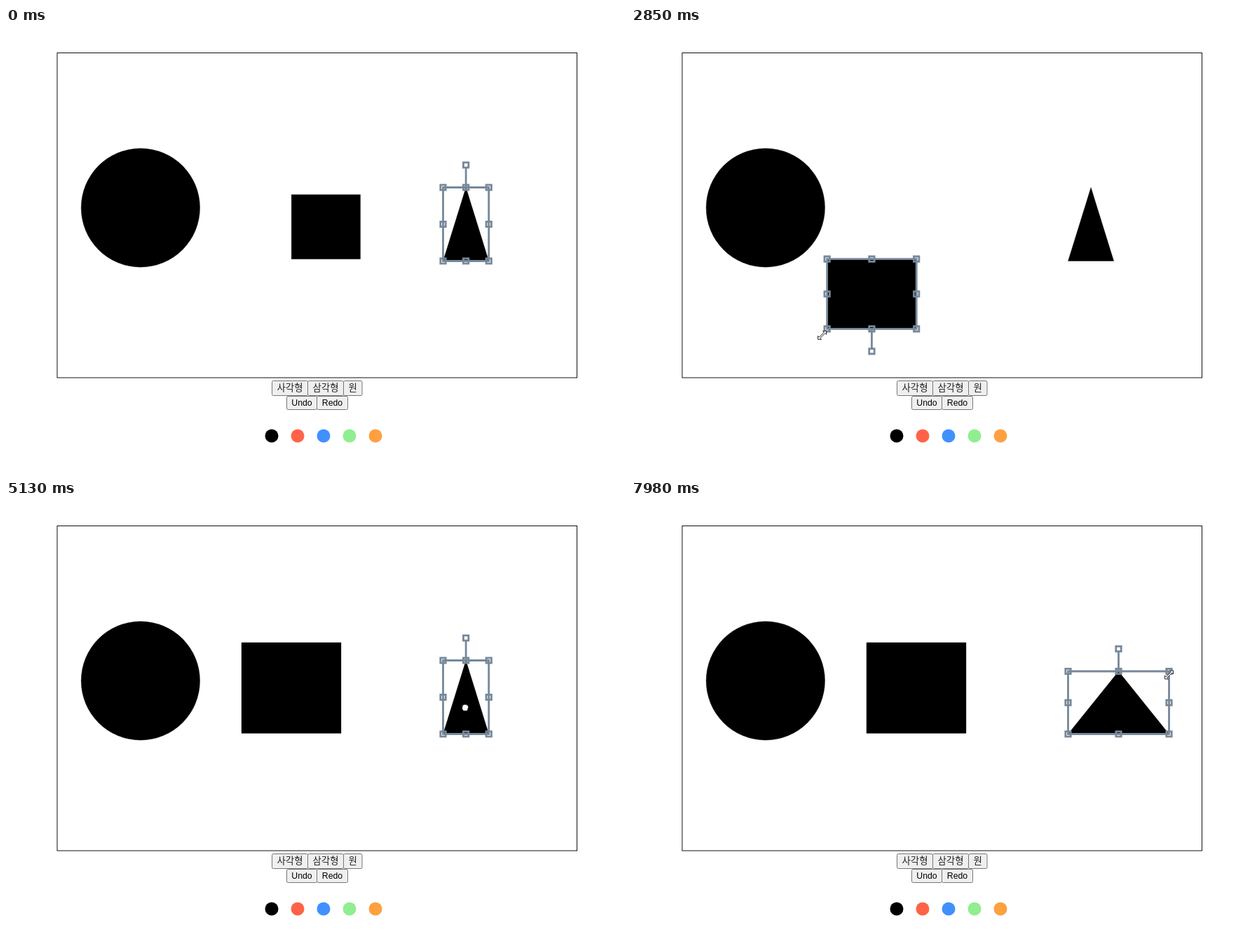
An HTML page that plays this animation: 883x635 px, repeating every 8000 ms.

```html
<!DOCTYPE html>
<html lang="ko">
<head>
<meta charset="utf-8">
<title>Shape editor</title>
<style>
  html, body { margin: 0; width: 100%; height: 100%; overflow: hidden; background: #fff; }
  svg { display: block; width: 883px; height: 635px; }
  .button { fill: #efefef; stroke: #767676; }
  .shape { stroke: #000; stroke-opacity: .4; stroke-width: .8; }
  text { text-anchor: middle; font: 12.3px "Liberation Sans", Arial, sans-serif; }
  text.ko { font: 300 13.4px "Noto Sans CJK KR", "Noto Sans CJK", sans-serif; fill: #222; }
  #selection { fill: none; stroke: #778899; stroke-width: 2.8; }
  #pointer { fill: #fff; stroke: #222; stroke-width: 1; }
</style>
</head>
<body>
<svg viewBox="0 0 883 635">
  <rect x="73" y="35.5" width="741.5" height="463.5" fill="none" stroke="#111"/>
  <g id="toolbar"></g>
  <circle class="shape" cx="191.9" cy="256.5" r="84.7"/>
  <path class="shape" id="square"/>
  <path class="shape" id="triangle"/>
  <path id="selection"/>
  <path id="pointer"/>
</svg>
<script>
const $ = id => document.getElementById(id);
const LOOP = 8000, TICK = 98.6, OFFSET = 18;

const button = (label, x, y, w, h, cls = '') =>
  `<rect class="button" x="${x}" y="${y}" width="${w}" height="${h}" rx="2"/>
   <text class="${cls}" x="${x + w / 2}" y="${y + h / 2 + 4.4}">${label}</text>`;

$('toolbar').innerHTML =
  button('사각형', 379.5, 503.5, 51, 21, 'ko') +
  button('삼각형', 430.5, 503.5, 51, 21, 'ko') +
  button('원', 481.5, 503.5, 26.5, 21, 'ko') +
  button('Undo', 400.5, 525.5, 43, 19) +
  button('Redo', 443.5, 525.5, 44, 19) +
  ['#000', '#ff6347', '#4090ff', '#90ee90', '#ffa040'].map((color, i) =>
    `<circle cx="${379 + 37 * i}" cy="582" r="9.5" fill="${color}"/>`).join('');

// Gestures are smooth curves through a few turning points: [tick, x, y].
const toSquare = gesture([4, 682, 616], [6, 477, 341], [8, 468, 265], [13, 470, 281], [15, 510, 242]);
const resizeSquare = gesture([21, 505.5, 237.8], [22, 531.5, 224], [24, 592, 130],
  [27, 490, 400], [29, 279.7, 429.3], [31, 261, 442], [34, 480, 265], [36, 265, 200]);
const intoSquare = gesture([36, 268, 205], [38, 385, 265]);
const moveSquare = gesture([38, 265, 200], [41, 269, 356], [44, 305.5, 280], [46, 527, 250], [48, 336, 202]);
const toTriangle = gesture([48, 456, 267], [52, 655, 295], [56, 697, 235]);
const resizeTriangle = gesture([59, 688.7, 227.5], [63, 570.3, 390], [65, 478, 428],
  [69.5, 672, 194], [71, 761.3, 237.3], [72, 781, 253], [75, 732, 262], [78, 781, 230],
  [80, 781, 242], [81, 767.5, 243]);

// Monotone cubic interpolation: slows to a stop at each turn and never overshoots.
function gesture(...keys) {
  const slope = (i, axis) =>
    (keys[i + 1][axis] - keys[i][axis]) / (keys[i + 1][0] - keys[i][0]);
  const tangent = (i, axis) => {
    if (i === 0 || i === keys.length - 1) return 0;
    const a = slope(i - 1, axis), b = slope(i, axis);
    return a * b > 0 ? 2 * a * b / (a + b) : 0;
  };
  return t => {
    if (t <= keys[0][0]) return keys[0].slice(1);
    const i = keys.findIndex(key => key[0] > t) - 1;
    if (i < 0) return keys[keys.length - 1].slice(1);
    const span = keys[i + 1][0] - keys[i][0], k = (t - keys[i][0]) / span;
    return [1, 2].map(axis => {
      const from = keys[i][axis], to = keys[i + 1][axis];
      return from + (to - from) * k * k * (3 - 2 * k) +
        span * k * (1 - k) * ((1 - k) * tangent(i, axis) - k * tangent(i + 1, axis));
    });
  };
}

const cursors = {
  arrow: 'M0 0V15L3.6 11.8 6 17.5 8.4 16.5 6 11H11Z',
  hand: 'M-4-1Q-5-4-2.5-4 -1-5.5.5-4.5 2-5 3-3.5 5-3.5 4.5 0L3 4.5H-2.5L-4.7 1Z',
  resize: 'M6-6H1L2.8-4.2-4.2 2.8-6 1V6H-1L-2.8 4.2 4.2-2.8 6-1Z'
};

// A box runs from its fixed left/base to the dragged corner; it may be flipped.
function squareBox(tick) {
  if (tick < 38) {
    const [right, top] = resizeSquare(tick);
    return { left: 407.2, base: 329.7, right, top };
  }
  const [left, top] = moveSquare(tick);
  return { left, base: top + 129.5, right: left + 142, top };
}

function triangleBox(tick) {
  const [right, top] = resizeTriangle(tick);
  return { left: 623.5, base: 332.5, right, top };
}

function selectionPath({ left, base, right, top }) {
  const cx = (left + right) / 2, cy = (top + base) / 2;
  const up = top > base ? 1 : -1, knobY = top + up * 32;
  const handle = (x, y) => `M${x - 3.7} ${y - 3.7}h7.4v7.4h-7.4z`;
  let path = `M${left} ${top}H${right}V${base}H${left}ZM${cx} ${top}V${knobY - up * 4}` +
    handle(cx, knobY);
  for (const x of [left, cx, right])
    for (const y of [top, cy, base])
      if (x !== cx || y !== cy) path += handle(x, y);
  return path;
}

function pointerAt(tick) {
  // While resizing, the pointer runs slightly ahead of the corner.
  const ahead = corner => {
    const [x, y] = corner(tick + 0.45);
    return ['resize', x, y + 5];
  };
  if (tick < 22) return [tick < 7 ? 'arrow' : tick < 14 ? 'hand' : 'resize', ...toSquare(tick)];
  if (tick < 37) return ahead(resizeSquare);
  if (tick < 39) return ['hand', ...intoSquare(tick)];
  if (tick < 49) {
    const [x, y] = moveSquare(tick);
    return ['hand', x + 120, y + 65];
  }
  if (tick < 60) return [tick < 51 ? 'arrow' : tick < 55 ? 'hand' : 'resize', ...toTriangle(tick)];
  return ahead(resizeTriangle);
}

function draw(time) {
  const tick = Math.floor((time % LOOP + OFFSET) / TICK);
  const s = squareBox(tick), t = triangleBox(tick);
  $('square').setAttribute('d', `M${s.left} ${s.top}H${s.right}V${s.base}H${s.left}Z`);
  $('triangle').setAttribute('d',
    `M${t.left} ${t.base}H${t.right}L${(t.left + t.right) / 2} ${t.top}Z`);
  $('selection').setAttribute('d', selectionPath(tick >= 10 && tick < 52 ? s : t));

  const [cursor, x, y] = pointerAt(tick);
  $('pointer').setAttribute('d', tick < 4 ? '' : cursors[cursor]);
  $('pointer').setAttribute('transform', `translate(${x} ${y})`);
}

const start = performance.now();
function frame() {
  draw(performance.now() - start);
  requestAnimationFrame(frame);
}
frame();
</script>
</body>
</html>
```
